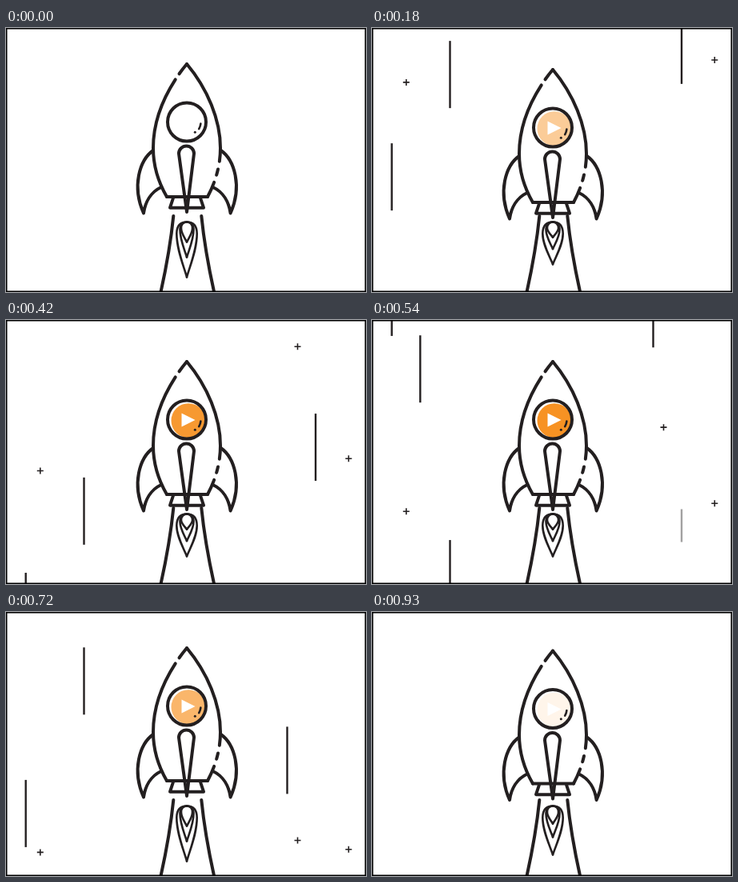
Recreate the animation shown at these times as an HTML page with a canvas. Size 450 px wide and 330 px high, loop 960 ms.

```html
<!DOCTYPE html>
<html lang="en">
<head>
<meta charset="utf-8">
<title>Rocket</title>
<style>
  html, body { margin: 0; width: 100%; height: 100%; overflow: hidden; background: #fff; }
  canvas { display: block; }
</style>
</head>
<body>
<canvas id="stage" width="450" height="330"></canvas>
<script>
const ctx = document.getElementById('stage').getContext('2d');
const W = 450, H = 330, LOOP = 960, STEP = 30, BOB = 120, GLOW_PEAK = 510;
const INK = '#231f20', ORANGE = '#f7901e';
const STREAK = 84, FADE = 137;

// Each item falls through the stage from start to end; ease 1 is linear, above 1 slows down.
const streaks = [
  { x: 97.5, start: 58, end: 650, ease: 1.2 },
  { x: 97.5, start: 653, end: 905, ease: 1.2 },
  { x: 24.7, start: 17, end: 511, ease: 2 },
  { x: 24.7, start: 529, end: 869, ease: 1.5 },
  { x: 387, start: 38, end: 688, ease: 0.75, gone: 607 },
  { x: 351.5, start: 508, end: 894, ease: 1 },
  { x: 60.3, start: 455, end: 796, ease: 1, gone: 698 }
];
const stars = [
  { x: 42.8, start: 48, end: 910, ease: 1.5 },
  { x: 428.3, start: 103, end: 910, ease: 1.5 },
  { x: 364.5, start: 371, end: 780, ease: 1 }
];

const clamp = v => Math.max(0, Math.min(1, v));

function fall({ start, end, ease }, t, from, to) {
  const left = clamp((end - t) / (end - start));
  return to - (to - from) * Math.pow(left, ease);
}

function stroke(path, width, dash = []) {
  ctx.lineWidth = width;
  ctx.setLineDash(dash);
  ctx.stroke(new Path2D(path));
  ctx.setLineDash([]);
}

function arc(x, y, r, from, to, width) {
  ctx.lineWidth = width;
  ctx.beginPath();
  ctx.arc(x, y, r, from, to);
  ctx.stroke();
}

function disc(x, y, r, color) {
  ctx.fillStyle = color;
  ctx.beginPath();
  ctx.arc(x, y, r, 0, Math.PI * 2);
  ctx.fill();
}

function mirrored(axis, draw) {
  draw();
  ctx.save();
  ctx.translate(2 * axis, 0);
  ctx.scale(-1, 1);
  draw();
  ctx.restore();
}

function drawSky(t) {
  ctx.lineCap = 'butt';
  for (const streak of streaks) {
    const tip = fall(streak, t, 0, H + STREAK);
    const left = streak.gone ? clamp((streak.gone - t) / FADE) : 1;
    if (tip <= 0 || left === 0) continue;
    ctx.globalAlpha = left < 1 ? 0.25 + 0.35 * left : 1;
    stroke(`M${streak.x} ${tip}v${-STREAK * left}`, 2.4);
  }
  ctx.globalAlpha = 1;
  for (const star of stars) {
    const y = fall(star, t, -8, H + 6);
    stroke(`M${star.x - 4} ${y}h8M${star.x} ${y - 4}v8`, 1.6);
  }
}

function drawFlame(stretch) {
  const x = 226, top = 242.5;
  const drop = (w, length) => {
    const h = length * stretch, end = top + h;
    const shoulder = top + Math.min(w * 1.15, h * 0.4);
    const bend = shoulder + (end - shoulder) * 0.35;
    const low = end - (end - shoulder) * 0.3;
    mirrored(x, () => stroke(`M${x} ${end}C${x - w * 0.37} ${low} ${x - w} ${bend} ${x - w} ${shoulder}
      C${x - w} ${top + 3} ${x - w * 0.55} ${top} ${x} ${top}`, 2.6));
  };
  drop(12.7, 69);
  drop(8.5, 44);
  drop(7, 25);
}

function drawWindow(glow) {
  const x = 226, y = 117.5;
  ctx.globalAlpha = glow;
  disc(x + 2, y + 1.2, 21.5, ORANGE);
  ctx.globalAlpha = 1;
  ctx.fillStyle = '#fff';
  ctx.fill(new Path2D('M219.5 109.5L236.5 118L219.5 126.5Z'));
  arc(x, y, 24, 0, Math.PI * 2, 4);
  arc(x, y, 17.5, 0.12, 0.52, 2.6);
  disc(236.3, 130.2, 1.5, INK);
}

function drawRocket(glow) {
  stroke('M226 45C200 76 184 115 184 150C184 172 190 192 201 211', 4, [15.5, 8.5, 999]);
  stroke('M226 45C252 76 268 115 268 150C268 172 262 192 252 211', 4, [132, 10, 7.5, 9.5, 999]);
  stroke('M201 211H252M209.5 211L205 224.7H247L242.5 211', 4);
  mirrored(226.3, () =>
    stroke('M184 153C167 165 157 198 172 231.5C174 218 181 205 194 199', 4));
  stroke('M216 157A9.5 9.5 0 0 1 235 157L226 230Z', 4);
  drawWindow(glow);
}

function draw(t) {
  ctx.fillStyle = '#fff';
  ctx.fillRect(0, 0, W, H);
  ctx.strokeStyle = INK;
  ctx.lineJoin = 'round';
  drawSky(t);

  ctx.lineCap = 'round';
  const bob = 1 - Math.abs(1 - (t % BOB) / (BOB / 2));
  mirrored(226.8, () => stroke('M209.3 235Q205 278 193.5 330', 4));
  drawFlame(1 - 0.235 * bob);

  const ramp = t < GLOW_PEAK ? t / GLOW_PEAK : (LOOP - t) / (LOOP - GLOW_PEAK);
  ctx.save();
  ctx.translate(0, 7 * bob);
  drawRocket(1 - Math.pow(1 - ramp, 1.4));
  ctx.restore();

  // Half of the outline lies outside the stage.
  ctx.strokeStyle = '#000';
  ctx.lineWidth = 3;
  ctx.lineJoin = 'miter';
  ctx.strokeRect(0, 0, W, H);
}

const start = performance.now();
function tick() {
  const t = (performance.now() - start) % LOOP;
  draw(Math.floor(t / STEP) * STEP);
  requestAnimationFrame(tick);
}
tick();
</script>
</body>
</html>
```
